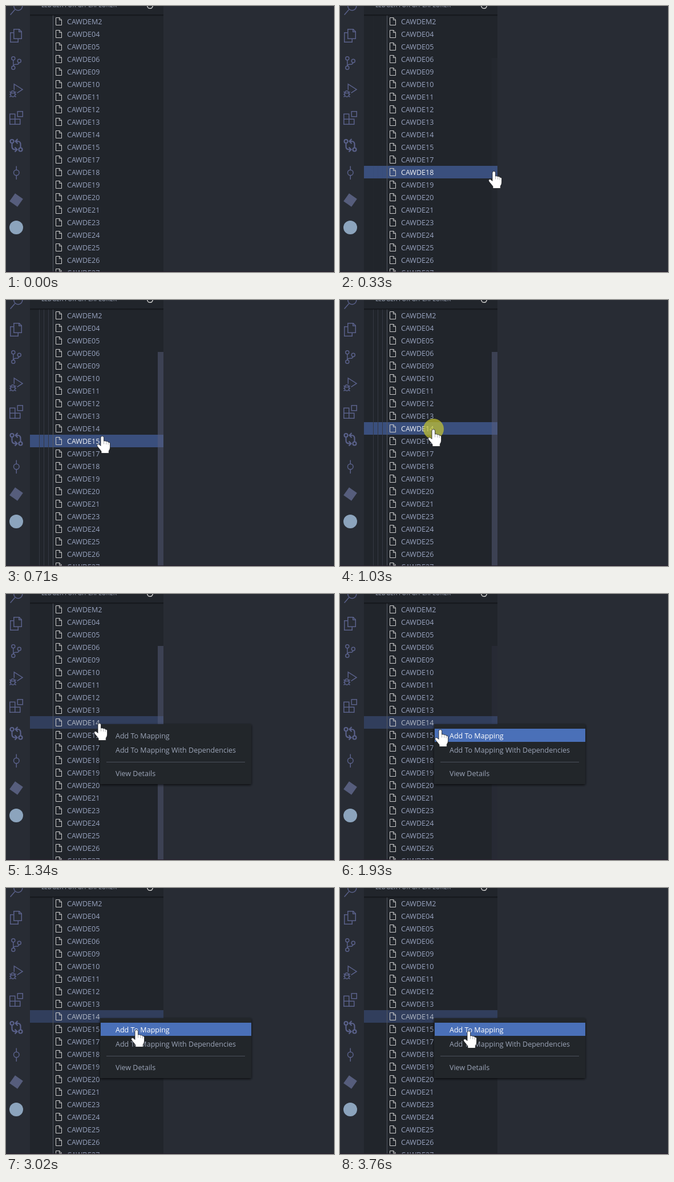
An HTML page for the animation above (3830 ms loop, 575 by 466 pixels).

```html
<!DOCTYPE html>
<html lang="en">
<head>
<meta charset="utf-8">
<title>Explorer context menu</title>
<style>
  html, body { margin: 0; width: 100%; height: 100%; overflow: hidden; background: #282c34; }
  svg { display: block; width: 575px; height: 466px; }
  text { font: 12.52px "Open Sans", "Noto Sans", sans-serif; fill: #9ca5b8; white-space: pre; }
  #rows text { fill: #98a3bf; }
  .title { font-size: 10.35px; }
  .icons { fill: none; stroke: #5a618a; stroke-width: 1.5; }
  .page { fill: none; stroke: #cdcdcd; stroke-width: 1; }
</style>
</head>
<body>
<svg viewBox="0 0 575 466">
  <defs>
    <linearGradient id="fade" x2="0" y2="1">
      <stop stop-color="#101216"/>
      <stop offset="1" stop-color="#101216" stop-opacity="0"/>
    </linearGradient>
    <filter id="shadow" x="-10%" y="-15%" width="120%" height="135%">
      <feDropShadow dx="0" dy="1.5" stdDeviation="2" flood-color="#000" flood-opacity=".75"/>
    </filter>
  </defs>
  <rect width="575" height="466" fill="#282c34"/>
  <rect x="42" width="234" height="466" fill="#21252b"/>

  <g class="icons">
    <g transform="translate(6 -8)">
      <circle cx="15.25" cy="8.25" r="7.5"/><path d="M9.6 14.2 1.6 23.4"/>
    </g>
    <path transform="translate(6 40)" d="M7.75.75H17.2L21.25 4.8V17.25H7.75ZM16.75.75V5.25H21.25M7.75 6.75H1.75V23.25H15.25V17.25"/>
    <g transform="translate(6 88)">
      <circle cx="6.8" cy="3.75" r="3"/><circle cx="6.8" cy="20.2" r="3"/><circle cx="17.25" cy="8.25" r="3"/>
      <path d="M6.8 6.75V17.2M17 11.25Q16 14.2 13.5 14.2H10.5Q7.6 14.2 6.9 17.2"/>
    </g>
    <g transform="translate(6 136)">
      <path d="M8.25 11V.9L23 10.2 13.5 16.4"/>
      <path d="M3 16.5V15.7a3 3 0 0 1 6 0V16.5M2.25 16.5H9.75V19.3a3.75 3.75 0 0 1-7.5 0Z"/>
      <path d="M.5 14 2.5 16M11.5 14 9.5 16M0 18.75H2.25M9.75 18.75H12M.5 23.5 2.6 21.4M11.5 23.5 9.4 21.4"/>
    </g>
    <g transform="translate(6 184)">
      <path d="M.75 5.25H9.75V14.25H18.75V23.25H.75ZM.75 14.25H9.75V23.25"/>
      <rect x="14.25" y=".75" width="9" height="9"/>
    </g>
    <g stroke-width="2.2">
      <circle cx="10.500" cy="237" r="3"/><circle cx="25.500" cy="251.500" r="3"/>
      <path d="M10.500 240.500V246Q10.500 251.500 16 251.500H19M15.500 247.500 19.500 251.500 15.500 255.500M25.500 248V242.500Q25.500 237 20.500 237H17.500M20.500 233 16.500 237 20.500 241"/>
    </g>
    <circle cx="18.250" cy="292" r="4.800"/><path d="M18.250 280.500V287M18.250 297V304"/>
  </g>
  <rect x="9.500" y="331.500" width="17" height="17" fill="#565d7c" transform="rotate(35 18 340)"/>
  <circle cx="18" cy="388" r="12" fill="#8ca4bd"/>

  <rect id="hover" x="42" width="234" height="22"/>
  <path id="guides" d="M58.500 16V466M66.500 16V466M74.500 16V466" stroke="#343943"/>
  <path d="M82.500 16V466" stroke="#50555f"/>
  <g id="rows"></g>
  <rect id="bar" x="266" y="91" width="10" height="375" fill="#585e7c" fill-opacity=".5"/>

  <rect x="42" width="234" height="15" fill="#21252b"/>
  <rect x="42" y="15" width="234" height="3" fill="url(#fade)"/>
  <text class="title" x="62" y="2">LEDGER FOR GIT EXPLORER</text>
  <circle cx="252.500" cy="-.5" r="4.800" fill="none" stroke="#c5c5c5" stroke-width="1.600"/>
  <rect y="465" width="575" height="1" fill="#281d2c"/>

  <g id="menu">
    <rect x="165" y="228" width="265" height="105" fill="#21252b" filter="url(#shadow)"/>
    <rect id="pick" x="166" y="236" width="264" height="23" fill="#4a70b8"/>
    <path d="M176 294.500H419" stroke="#4b505b"/>
    <text id="first" x="192" y="253">Add To Mapping</text>
    <text x="192" y="278">Add To Mapping With Dependencies</text>
    <text x="192" y="319">View Details</text>
  </g>

  <circle id="click" cx="164" cy="226" r="18" fill="#c8c832"/>
  <g id="cursor" fill="#fff" stroke="#15171b" stroke-linejoin="round">
    <g id="hand">
      <path d="M7 3.300a2.800 2.800 0 0 1 5.600 0V9q2.600-1 4.200 .8 2.300-.7 3.500 1.200 3-.3 3.300 2.500V20q0 3.500-2.300 6.500V30.500H8V27L1.200 18.500Q-.2 16 1.600 14.800 3.600 13.800 5.500 16L7 17.500Z" stroke-width=".8"/>
      <path d="M12.600 9V14.500M16.800 10.500V15M20.300 11.500V15.500" stroke-opacity=".35"/>
    </g>
    <path id="arrow" d="M9.500 .5V23L14.500 18.200 18 26 21.500 24.500 18 17H25Z"/>
  </g>
</svg>
<script>
const LOOP = 3830, MENU_AT = 1210, PICK_AT = 1870;
const NAMES = 'M2 04 05 06 09 10 11 12 13 14 15 17 18 19 20 21 23 24 25 26 27'.split(' ');
const CHOSEN = NAMES.indexOf('14');

// start, end, steps, and the cursor corner reached at the end
const MOVES = [
  [70, 70, 1, 383, 330],
  [130, 520, 7, 168, 258],
  [570, 570, 1, 164, 249],
  [640, 830, 4, 154, 226],
  [1740, 1930, 4, 166, 237],
  [2000, 2190, 4, 205, 238],
  [2570, 2570, 1, 211, 245],
  [2640, 3020, 7, 219, 248],
  [3200, 3200, 1, 218, 247],
  [3580, 3580, 1, 217, 247],
  [3760, 3760, 1, 216, 250]
];

const el = id => document.getElementById(id);
const rowTop = i => 16 + 22 * i;
const ramp = (t, a, b) => Math.min(1, Math.max(0, (t - a) / (b - a)));
const show = (node, on) => node.setAttribute('visibility', on ? 'visible' : 'hidden');

el('rows').innerHTML = NAMES.map((name, i) =>
  `<g transform="translate(0 ${rowTop(i)})">
    <path class="page" d="M87.500 4.500h6.300l3.700 3.700v9.300h-10zM93.500 4.500v4h4"/>
    <text x="107" y="16">CAWDE${name}</text>
  </g>`).join('');
const labels = [...el('rows').querySelectorAll('text')];

function cursorAt(t) {
  let x = 383, y = 330;
  for (const [start, end, steps, toX, toY] of MOVES) {
    if (t < start) break;
    const gap = (end - start) / (steps - 1 || 1);
    const done = gap ? Math.min(steps, 1 + Math.floor((t - start) / gap + 1e-6)) : 1;
    x += (toX - x) * done / steps;
    y += (toY - y) * done / steps;
  }
  return [Math.round(x), Math.round(y)];
}

function draw(t) {
  const [x, y] = cursorAt(t);
  const menuOpen = t >= MENU_AT, picking = t >= PICK_AT;
  const inList = t >= 70 && x + 10 < 276;

  el('cursor').setAttribute('transform', `translate(${x} ${y})`);
  show(el('hand'), inList);
  show(el('arrow'), t >= 70 && !inList);

  const row = menuOpen ? CHOSEN : Math.floor((y - 16) / 22);
  show(el('hover'), inList);
  el('hover').setAttribute('y', rowTop(row));
  el('hover').setAttribute('fill', menuOpen ? '#313e5c' : '#3a4f7d');
  labels.forEach((label, i) => {
    label.style.fill = inList && i === row ? (menuOpen ? '#b2b9c6' : '#f0f2f6') : '';
  });

  const shown = ramp(t, 325, 425);
  el('guides').setAttribute('opacity', menuOpen ? 0 : shown);
  el('bar').setAttribute('opacity', shown * (1 - ramp(t, 1740, 1980)));

  show(el('menu'), menuOpen);
  show(el('pick'), picking);
  el('first').style.fill = picking ? '#fff' : '';
  el('click').setAttribute('opacity', t < 1030 ? 0 : 0.7 * (1 - ramp(t, 1120, 1320)));
}

const began = performance.now();
function tick() {
  draw((performance.now() - began) % LOOP);
  requestAnimationFrame(tick);
}
tick();
</script>
</body>
</html>
```
